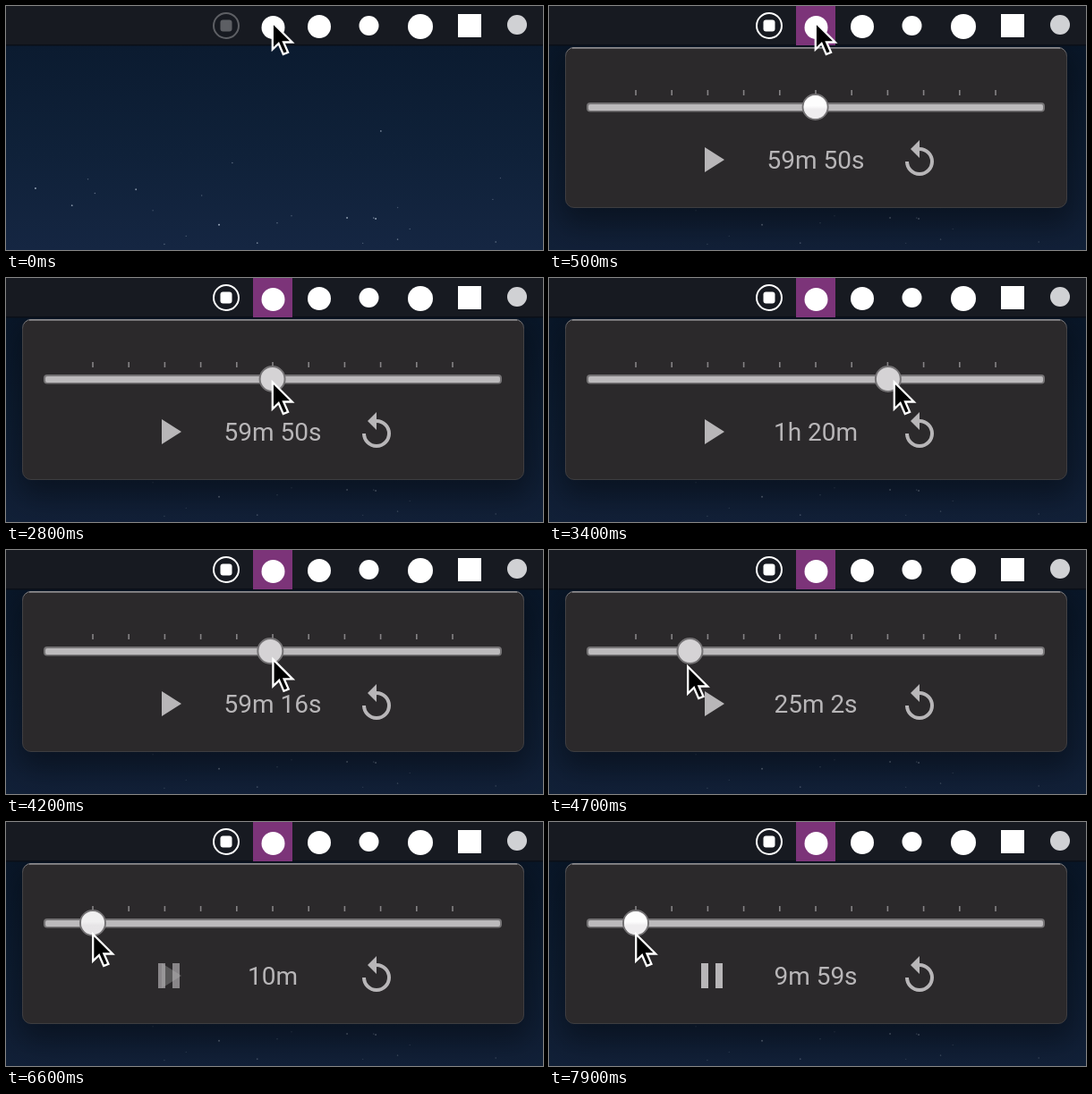
Write an HTML page that moves like this. It is 600 px wide and 273 px high and loops after 8 s.

```html
<!DOCTYPE html>
<html lang="en">
<head>
<meta charset="utf-8">
<title>Menu bar timer</title>
<style>
  html, body { margin: 0; width: 100%; height: 100%; overflow: hidden; background: #0d1d34; }
  svg { display: block; width: 600px; height: 273px; }
  #time { font: 400 28px Roboto, Arial, sans-serif; text-anchor: middle; }
</style>
</head>
<body>
<svg viewBox="0 0 600 273">
  <defs>
    <linearGradient id="sky" x1="0" y1="0" x2="0" y2="1">
      <stop offset=".16" stop-color="#0b1b30"/>
      <stop offset=".6" stop-color="#0f2139"/>
      <stop offset="1" stop-color="#152642"/>
    </linearGradient>
    <linearGradient id="rim" x1="0" y1="0" x2="0" y2="1">
      <stop offset="0" stop-color="#8b8a8c"/>
      <stop offset=".06" stop-color="#434245"/>
      <stop offset="1" stop-color="#3e3d40"/>
    </linearGradient>
    <linearGradient id="white" x1="0" y1="0" x2="0" y2="1">
      <stop offset=".45" stop-color="#fdfdfd"/>
      <stop offset=".6" stop-color="#efedef"/>
    </linearGradient>
    <filter id="blur" x="-10%" y="-20%" width="120%" height="150%">
      <feGaussianBlur stdDeviation="16"/>
    </filter>
  </defs>

  <rect width="600" height="273" fill="url(#sky)"/>
  <g id="stars" fill="#b9c6d6"></g>

  <g id="shade">
    <rect width="600" height="273" fill-opacity=".15"/>
    <rect x="14" y="50" width="572" height="196" rx="12" fill-opacity=".35" filter="url(#blur)"/>
  </g>

  <rect width="600" height="44" fill="#171a21"/>
  <rect y="43" width="600" height="1.5" fill="#0b0f17"/>
  <rect id="active" x="276" width="44" height="44" fill="#7c3479"/>

  <g id="stop">
    <circle cx="246" cy="22" r="14" fill="none" stroke="#fff" stroke-width="2"/>
    <rect x="239.5" y="15.5" width="13" height="13" rx="3" fill="#fff"/>
  </g>
  <g fill="#fff">
    <circle cx="298.5" cy="24" r="13"/>
    <circle cx="350" cy="23" r="13"/>
    <circle cx="405.5" cy="22" r="11"/>
    <circle cx="463" cy="23" r="14"/>
    <rect x="505" y="9" width="26" height="26"/>
    <circle cx="571" cy="21" r="11" fill="#d0d1d4"/>
  </g>

  <g id="panel">
    <rect x="18.5" y="46.5" width="560" height="179" rx="9.5" fill="#2b292b" stroke="url(#rim)"/>
    <path d="M26 47H571" stroke="#8b8a8c" stroke-width="1.5"/>
    <g id="ticks" fill="#858385"></g>
    <rect x="42" y="108" width="512" height="10.5" rx="4" fill="#757375"/>
    <rect x="44" y="110" width="508" height="7" rx="2" fill="#bcbabc"/>
    <g id="knob">
      <circle r="14" fill="#d5d3d5" stroke="#747274" stroke-width="2"/>
      <circle id="shine" r="13" fill="url(#white)"/>
    </g>
    <g fill="#b8b6b8">
      <path id="play" d="M174 158v28l22-14z"/>
      <path id="pause" d="M170 158h8v28h-8zM186 158h8v28h-8z"/>
      <path transform="translate(390 148) scale(2)" d="M12 5V1L7 6l5 5V7a6 6 0 1 1-6 6H4a8 8 0 1 0 8-8z"/>
      <text id="time" x="298" y="182"></text>
    </g>
  </g>

  <path id="cursor" d="M1.5 2.5V32.500L8.300 26L13.500 38L18.800 35.800L13.800 24.500H23.500Z" fill="#000" stroke="#fff" stroke-width="2.3"/>
</svg>

<script>
const LOOP = 8000, STEP = 100;
const $ = id => document.getElementById(id);
const ramp = (t, from, to) => Math.min(1, Math.max(0, (t - from) / (to - from)));
const ease = p => p * p * (3 - 2 * p);
const mix = (a, b, p) => a + (b - a) * p;

function add(parent, tag, attrs) {
  const el = document.createElementNS('http://www.w3.org/2000/svg', tag);
  for (const k in attrs) el.setAttribute(k, attrs[k]);
  parent.appendChild(el);
}

let seed = 7;
const random = () => (seed = seed * 16807 % 2147483647) / 2147483647;

// Stars grow denser towards the horizon.
for (let i = 0; i < 25; i++) {
  const bright = mix(.3, .9, random() ** 2);
  add($('stars'), 'circle', {
    cx: 600 * random(),
    cy: mix(100, 272, Math.sqrt(random())),
    r: .5 + bright * .6,
    opacity: bright
  });
}

for (let i = 0; i < 11; i++) {
  add($('ticks'), 'rect', { x: 96.2 + i * 40.2, y: 94, width: 1.6, height: 6 });
}

// Each drag eases the slider from where it stands to a new number of seconds.
const FIRST = 3590;
const drags = [
  { from: 2800, to: 3600, secs: 5026 },
  { from: 3800, to: 4700, secs: 1502 },
  { from: 4700, to: 5100, secs: 888 },
  { from: 5200, to: 6100, secs: 600 }
];
const secsAt = t => drags.reduce((s, d) => mix(s, d.secs, ease(ramp(t, d.from, d.to))), FIRST);
const knobX = secs => 56.7 + secs * .0671;

function label(secs) {
  const s = Math.round(secs), h = Math.floor(s / 3600), m = Math.floor(s / 60) % 60;
  const parts = h ? [[h, 'h'], [m, 'm']] : [[m, 'm'], [s % 60, 's']];
  return parts.filter(q => q[0]).map(q => q.join('')).join(' ');
}

// The pointer drops onto the knob, leads it a little to the right, then sags below it.
function pointer(t, knob) {
  const lead = 6.7 * (ease(ramp(t, 2800, 3400)) - ease(ramp(t, 3800, 4700)));
  const drop = 98 * ease(ramp(t, 1900, 2800));
  const sag = 14 * ease(ramp(t, 3800, 4700)) - 5 * ease(ramp(t, 4700, 5600));
  const lag = 2.5 * (ease(ramp(t, 3800, 4700)) - ease(ramp(t, 4700, 5600)));
  return [knob - 1.3 + lead - lag, 16 + drop + sag];
}

function draw(t) {
  const secs = secsAt(t), knob = knobX(secs);
  const [px, py] = pointer(t, knob);
  const open = ramp(t, 200, 500);
  const run = ramp(t, 6400, 6700);

  $('panel').style.opacity = $('shade').style.opacity = open;
  $('active').style.opacity = t >= 300 ? 1 : 0;
  $('stop').style.opacity = mix(.3, 1, open);
  $('stars').style.opacity = mix(1, .6, open);

  $('cursor').setAttribute('transform', `translate(${px} ${py})`);
  $('knob').setAttribute('transform', `translate(${knob} 113)`);
  $('shine').style.opacity = t < 2800 ? 1 : run;
  $('play').style.opacity = 1 - run;
  $('pause').style.opacity = run;
  $('time').textContent = label(t >= 7500 ? secs - 1 : secs);
}

const start = performance.now();
function frame(now) {
  const t = Math.max(0, now - start) % LOOP;
  draw(Math.floor(t / STEP) * STEP);
  requestAnimationFrame(frame);
}
draw(0);
requestAnimationFrame(frame);
</script>
</body>
</html>
```
